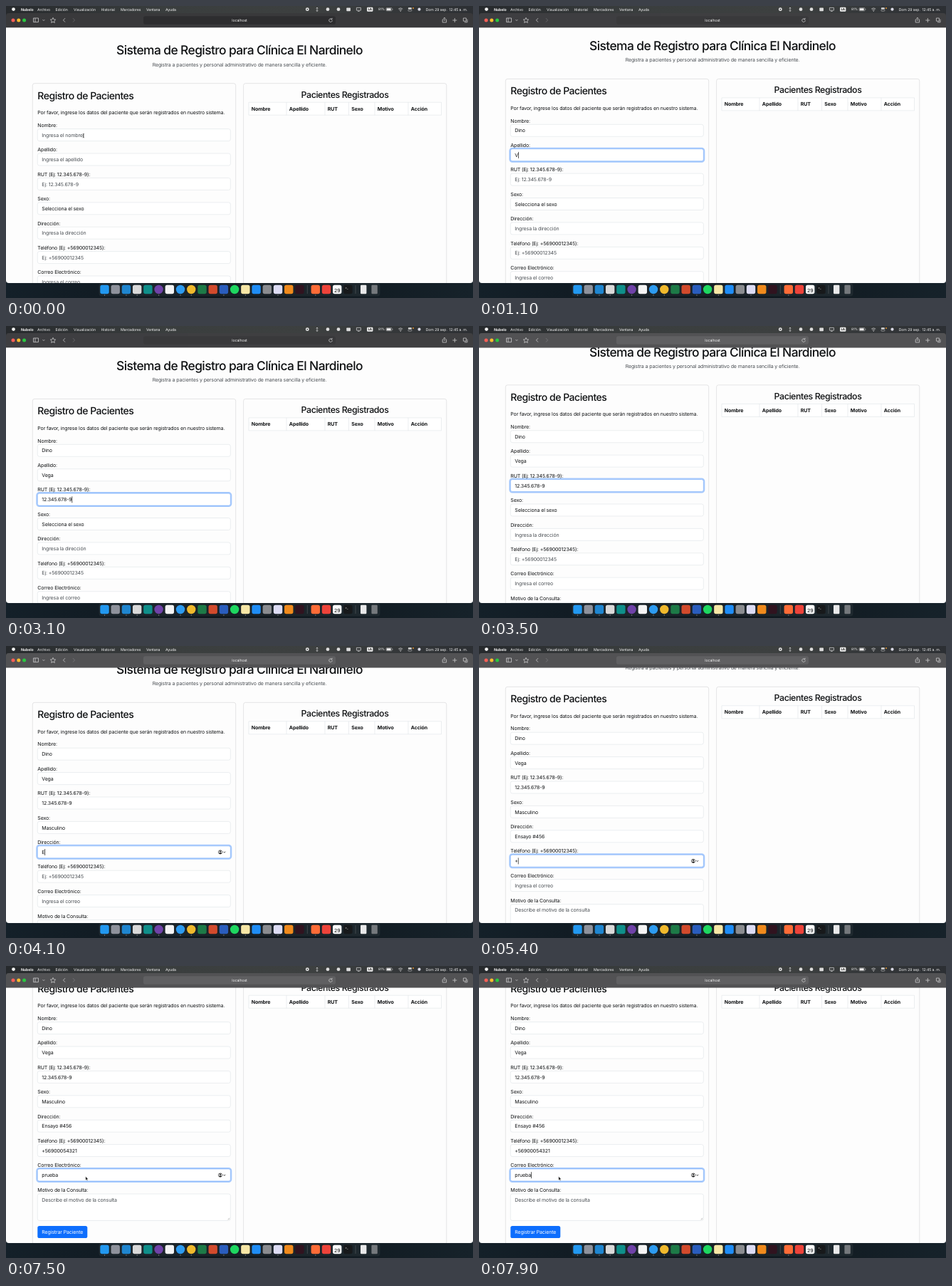
An HTML page that plays this animation: 656 px wide and 410 px high, repeating every 8000 ms.

```html
<!DOCTYPE html>
<html lang="es">
<head>
<meta charset="utf-8">
<title>Registro</title>
<style>
html, body { margin: 0; width: 100%; height: 100%; overflow: hidden; background: #000; }
svg { display: block; width: 656px; height: 410px; }
text { font: 7px Inter, "Open Sans", sans-serif; letter-spacing: -.018em; fill: #0e1012; white-space: pre; text-rendering: geometricPrecision; }
.h1 { font-size: 17.4px; }
.h2 { font-size: 14px; }
.h3 { font-size: 12.4px; }
.h1, .h2, .h3 { font-weight: 500; letter-spacing: -.034em; }
.mid { text-anchor: middle; }
.bold { font-weight: 700; }
.soft { fill: #484d52; }
.bar { font-size: 5.2px; fill: #f4f4f4; }
.white { fill: #fff; }
.icon { fill: none; stroke: #c9c9cb; stroke-width: .8; }
.card { fill: none; stroke: #d3d4d6; stroke-width: .6; }
.field { fill: #fff; stroke: #dee2e6; stroke-width: .6; }
.focus { fill: #fff; stroke: #86b7fe; stroke-width: .7; }
.ring { fill: none; stroke: #0d6efd; stroke-opacity: .36; stroke-width: 2; }
</style>
</head>
<body>
<svg id="stage" viewBox="0 0 656 410"></svg>
<script>
const LOOP = 8000, TOP = 172.6, PITCH = 34.4;

const text = (x, y, s, cls = '', extra = '') => `<text x="${x}" y="${y}" class="${cls}" ${extra}>${s}</text>`;
const rect = (x, y, w, h, attrs) => `<rect x="${x}" y="${y}" width="${w}" height="${h}" ${attrs}/>`;
const dot = (x, y, r, fill) => `<circle cx="${x}" cy="${y}" r="${r}" fill="${fill}"/>`;
const icon = (d, attrs = '') => `<path class="icon" d="${d}" ${attrs}/>`;
const gradient = (id, ...colors) => `<linearGradient id="${id}">` +
  colors.map((c, i) => `<stop offset="${i / (colors.length - 1)}" stop-color="${c}"/>`).join('') + '</linearGradient>';

// keys: runs of [first key time, ms per key, number of keys]
const fields = [
  { label: 'Nombre:', hint: 'Ingresa el nombre', value: 'Dino', focus: 300, keys: [[500, 120, 4]] },
  { label: 'Apellido:', hint: 'Ingresa el apellido', value: 'Vega', focus: 1000, keys: [[1100, 100, 4]] },
  { label: 'RUT (Ej: 12.345.678-9):', hint: 'Ej: 12.345.678-9', value: '12.345.678-9', focus: 1600, keys: [[1700, 100, 12]] },
  { label: 'Sexo:', hint: 'Selecciona el sexo', value: 'Masculino', focus: 3700, keys: [[3850, 0, 9]], select: true },
  { label: 'Dirección:', hint: 'Ingresa la dirección', value: 'Ensayo #456', focus: 4000, keys: [[4100, 100, 3], [4500, 65, 8]], autofill: true },
  { label: 'Teléfono (Ej: +56900012345):', hint: 'Ej: +56900012345', value: '+56900054321', focus: 5300, keys: [[5400, 100, 4], [5860, 50, 8]], autofill: true },
  { label: 'Correo Electrónico:', hint: 'Ingresa el correo', value: 'prueba', focus: 6450, keys: [[6500, 75, 6]], autofill: true },
];

// [start, end, offset reached]
const scrolls = [[200, 500, 6.3], [3200, 3600, 29.4], [5000, 5250, 51.4], [6150, 6420, 94]];

function formRow(f, i) {
  const y = TOP + PITCH * i;
  return text(44.3, y - 2.7, f.label) + rect(44.3, y, 271, 17, 'rx="2.6" class="field"') +
    text(50.3, y + 11.2, f.hint, f.select ? '' : 'soft', `id="value${i}"`);
}

function page() {
  const edges = [341, 394, 448, 481.5, 518, 565, 611.5];
  const heads = ['Nombre', 'Apellido', 'RUT', 'Sexo', 'Motivo', 'Acción'];
  return text(328, 68.4, 'Sistema de Registro para Clínica El Nardinelo', 'h1 mid') +
    text(328, 84.6, 'Registra a pacientes y personal administrativo de manera sencilla y eficiente.', 'soft mid') +
    rect(37.3, 108.7, 285.4, 376, 'rx="2.8" class="card"') +
    rect(333.6, 108.7, 285.2, 376, 'rx="2.8" class="card"') +
    text(44.3, 130.6, 'Registro de Pacientes', 'h2') +
    text(44.3, 152.2, 'Por favor, ingrese los datos del paciente que serán registrados en nuestro sistema.') +
    text(476, 128.8, 'Pacientes Registrados', 'h3 mid') +
    `<path class="field" d="M341 135.2H611.5V153.2H341Z${edges.slice(1, -1).map(x => `M${x} 135.2V153.2`).join('')}"/>` +
    heads.map((h, i) => text(edges[i] + 3.8, 146.7, h, 'bold')).join('') +
    fields.map(formRow).join('') +
    text(44.3, 411, 'Motivo de la Consulta:') +
    rect(44.3, 414, 271, 37.5, 'rx="2.6" class="field"') +
    text(50.3, 424.8, 'Describe el motivo de la consulta', 'soft') +
    icon('M311.5 450.3L314 447.8M313 450.3L314 449.3', 'style="stroke:#888;stroke-width:.5"') +
    rect(44.3, 459, 70, 17, 'rx="2.6" fill="#0d6efd"') +
    text(79.3, 470.2, 'Registrar Paciente', 'mid white') +
    `<g id="active">${rect(43.3, -1, 273, 19, 'rx="3.5" class="ring"')}${rect(44.3, 0, 271, 17, 'rx="2.6" class="focus"')}
     <text id="typed" x="50.3" y="11.2"></text>${rect(0, 4.2, .7, 9, 'id="caret" fill="#111"')}
     <g id="autofill"><circle cx="301" cy="8.6" r="2.6" fill="none" stroke="#111" stroke-width=".7"/>
     ${dot(301, 7.8, 1, '#111')}<path d="M299.2 10.3q1.8-2 3.6 0l-1.8 1z" fill="#111"/>
     ${icon('M305.2 7.9l1.5 1.5l1.5-1.5', 'style="stroke:#111"')}</g></g>`;
}

function menuBar() {
  const items = { 44: 'Archivo', 69.5: 'Edición', 95: 'Visualización', 133.5: 'Historial', 161: 'Marcadores', 197: 'Ventana', 224: 'Ayuda' };
  return dot(10.5, 4.6, 2.4, '#f0f0f0') +
    text(21, 6.5, 'Nubelo', 'bar bold') +
    Object.entries(items).map(([x, s]) => text(x, 6.5, s, 'bar')).join('') +
    dot(423.3, 4.7, 2.4, '#eee') + dot(423.3, 4.7, .9, '#333638') +
    icon('M437 2V7.5M435.8 3.3L437 2L438.2 3.3M435.8 6.2L437 7.5L438.2 6.2') +
    dot(452, 4.7, 2.4, '#ddd') + dot(467, 4.7, 2.4, '#ddd') +
    rect(478.3, 2.4, 5.6, 4.8, 'rx=".8" fill="#ddd"') +
    icon('M492.4 2.4h6v3.7h-6zM494 7.4h2.8') +
    rect(507, 1.7, 8.4, 6, 'rx="1.2" fill="#eee"') +
    text(511.2, 6.4, 'LA', 'bold mid', 'style="font-size:4.4px;fill:#222"') +
    text(523, 6.4, '81%', 'bar', 'style="font-size:4.6px"') +
    rect(534, 2.6, 8.2, 4.2, 'rx="1" class="icon" style="stroke-width:.5"') +
    rect(534.7, 3.2, 6, 3, 'rx=".5" fill="#eee"') + rect(542.7, 4, .6, 1.4, 'fill="#bbb"') +
    icon('M551.2 4.1q3-2.6 6 0M552.3 5.5q1.9-1.5 3.8 0') + dot(554.2, 7, .7, '#ddd') +
    rect(564.8, 2.3, 5.2, 2.2, 'rx="1.1" fill="#ddd"') + rect(564.8, 5.1, 5.2, 2.2, 'rx="1.1" class="icon" style="stroke-width:.5"') +
    dot(572, 3, .9, '#f39a2d') + dot(580.5, 4.7, 2.1, '#d8d8e4') +
    text(589.7, 6.5, 'Dom 29 sep.  12:45 a. m.', 'bar');
}

function toolBar() {
  const addressBox = 'rx="2.8"';
  return rect(0, 10, 656, 20.3, 'fill="#39393b"') + rect(193, 14.3, 270, 11.4, `${addressBox} fill="#2d2d2f"`) +
    `<g id="tint">${rect(0, 10, 656, 20.3, 'fill="#525254"')}${rect(193, 14.3, 270, 11.4, `${addressBox} fill="#606062"`)}</g>` +
    dot(10, 20, 2.5, '#ff5f57') + dot(17.8, 20, 2.5, '#febc2e') + dot(25.6, 20, 2.5, '#28c840') +
    icon('M38.5 17h7v5.6h-7zM41 17v5.6M51.5 19.2l1.4 1.4l1.4-1.4') +
    icon('M66 16.4l1.1 2.4l2.6.3l-1.9 1.8l.5 2.6l-2.3-1.3l-2.3 1.3l.5-2.6l-1.9-1.8l2.6-.3z') +
    icon('M83 17.2l-2.6 2.7l2.6 2.7') + icon('M94 17.2l2.6 2.7l-2.6 2.7', 'opacity=".35"') +
    text(328, 21.9, 'localhost', 'bar mid') +
    icon('M457.7 18.6a2.3 2.3 0 1 0 .6 1.6M458 16.8v2h-2') +
    icon('M614.5 19h-1.3v4h5.4v-4h-1.3M615.9 21v-4.6M614.5 17.6l1.4-1.4l1.4 1.4') +
    icon('M627.3 20h6M630.3 17v6') +
    icon('M642.4 17h4v4.2h-4zM644 22.8h4v-4.2');
}

function dock() {
  const left = '#2298f0 #8e929c #1f86d0 #d9d9d9 #0f8f8a #6f42a8 #f4f4f4 #2d9bf0 #f0b92d #1d7a47 #d24a2c #2a5dbd #1ed760 #f6e7a6 #1f8df6 #8a8c90 #dcdcf4 #f08a1c #30131f'.split(' ');
  const right = '#ff6c37 #ee433a #fafafa #17191b'.split(' '), end = '#e9e9ea #75797d'.split(' ');
  const round = [5, 7, 8, 12], running = [0, 2, 3, 5, 7, 8, 11, 13, 16];
  const tile = (x, c, isRound) => isRound ? dot(x, 398, 6.2, c) : rect(x - 6.2, 391.8, 12.4, 12.4, `rx="2.7" fill="${c}"`);
  const at = i => 138.5 + 15.22 * i;
  return rect(130.5, 389.2, 395, 18.4, 'rx="4" fill="#fff" opacity=".05"') +
    left.map((c, i) => tile(at(i), c, round.includes(i))).join('') +
    running.map(i => dot(at(i), 406, .6, '#bbb')).join('') +
    right.map((c, i) => tile(434.8 + 15.2 * i, c)).join('') +
    end.map((c, i) => rect(498 + 15.4 * i, 391.8, 8.4, 12.4, `rx="1.2" fill="${c}"`)).join('') +
    text(465.2, 401.8, '29', 'mid') + text(476.2, 397.2, '&gt;_', 'bar', 'style="font-size:4px"') +
    icon('M423.3 392v12M491 392v12', 'opacity=".4" style="stroke-width:.5"') + dot(434.8, 406, .6, '#bbb');
}

const $ = id => document.getElementById(id);
$('stage').innerHTML =
  `<defs>${gradient('sky', '#26292c', '#3a3e3e', '#3d4040', '#2c2f33')}${gradient('ground', '#142029', '#0d151b', '#16222a')}
   <clipPath id="window">${rect(0, 10, 656, 379, 'rx="4"')}</clipPath></defs>` +
  rect(0, 0, 656, 30, 'fill="url(#sky)"') + rect(0, 380, 656, 30, 'fill="url(#ground)"') +
  `<g clip-path="url(#window)">${rect(0, 30, 656, 360, 'fill="#fdfdfd"')}<g id="page">${page()}</g>${toolBar()}</g>` +
  menuBar() + dock() +
  `<path id="beam" d="M107.7 179.3q1.1 0 1.1.8v4q0 .8-1.1.8M109.9 179.3q-1.1 0-1.1.8v4q0 .8 1.1.8" fill="none" stroke="#222" stroke-width=".6"/>
   <path id="arrow" d="M111.8 295.6v5.2l1.2-1.1l.9 1.9l.9-.4l-.9-1.9h1.6z" fill="#111" stroke="#fff" stroke-width=".4"/>`;

const show = (id, on) => $(id).setAttribute('visibility', on ? 'visible' : 'hidden');
const typedCount = (f, t) => f.keys.reduce((n, [start, step, count]) =>
  t < start ? n : n + (step ? Math.min(count, Math.floor((t - start) / step) + 1) : count), 0);

function scrollAt(t) {
  let y = 0;
  for (const [start, end, to] of scrolls) {
    const p = Math.max(0, Math.min(1, (t - start) / (end - start)));
    y += (to - y) * p * p * (3 - 2 * p);
  }
  return y;
}

function lastKey(f, t) {
  let last = f.focus;
  for (const [start, step, count] of f.keys)
    if (t >= start) last = start + step * Math.min(count - 1, step ? Math.floor((t - start) / step) : 0);
  return last;
}

function draw(t) {
  const scroll = scrollAt(t);
  $('page').setAttribute('transform', `translate(0 ${-scroll})`);
  // The translucent bar brightens as the page slides under it
  $('tint').setAttribute('opacity', Math.min(1, scroll / 25));
  const current = fields.findLastIndex(f => t >= f.focus);
  fields.forEach((f, i) => {
    const value = f.value.slice(0, typedCount(f, t)), el = $('value' + i);
    el.textContent = value || f.hint;
    el.setAttribute('class', value || f.select ? '' : 'soft');
    if (i !== current) return;
    $('active').setAttribute('transform', `translate(0 ${TOP + PITCH * i})`);
    const typed = $('typed');
    typed.textContent = value || f.hint;
    typed.setAttribute('class', el.getAttribute('class'));
    $('caret').setAttribute('x', 50.3 + (value ? typed.getComputedTextLength() : 0));
    $('caret').setAttribute('opacity', !f.select && (t - lastKey(f, t)) % 1000 < 500 ? 1 : 0);
    $('autofill').setAttribute('opacity', f.autofill ? 1 : 0);
  });
  $('active').setAttribute('display', current < 0 ? 'none' : 'inline');
  show('beam', t < 500);
  show('arrow', t >= 6150);
}

function tick() {
  draw(performance.now() % LOOP);
  requestAnimationFrame(tick);
}
tick();
</script>
</body>
</html>
```
